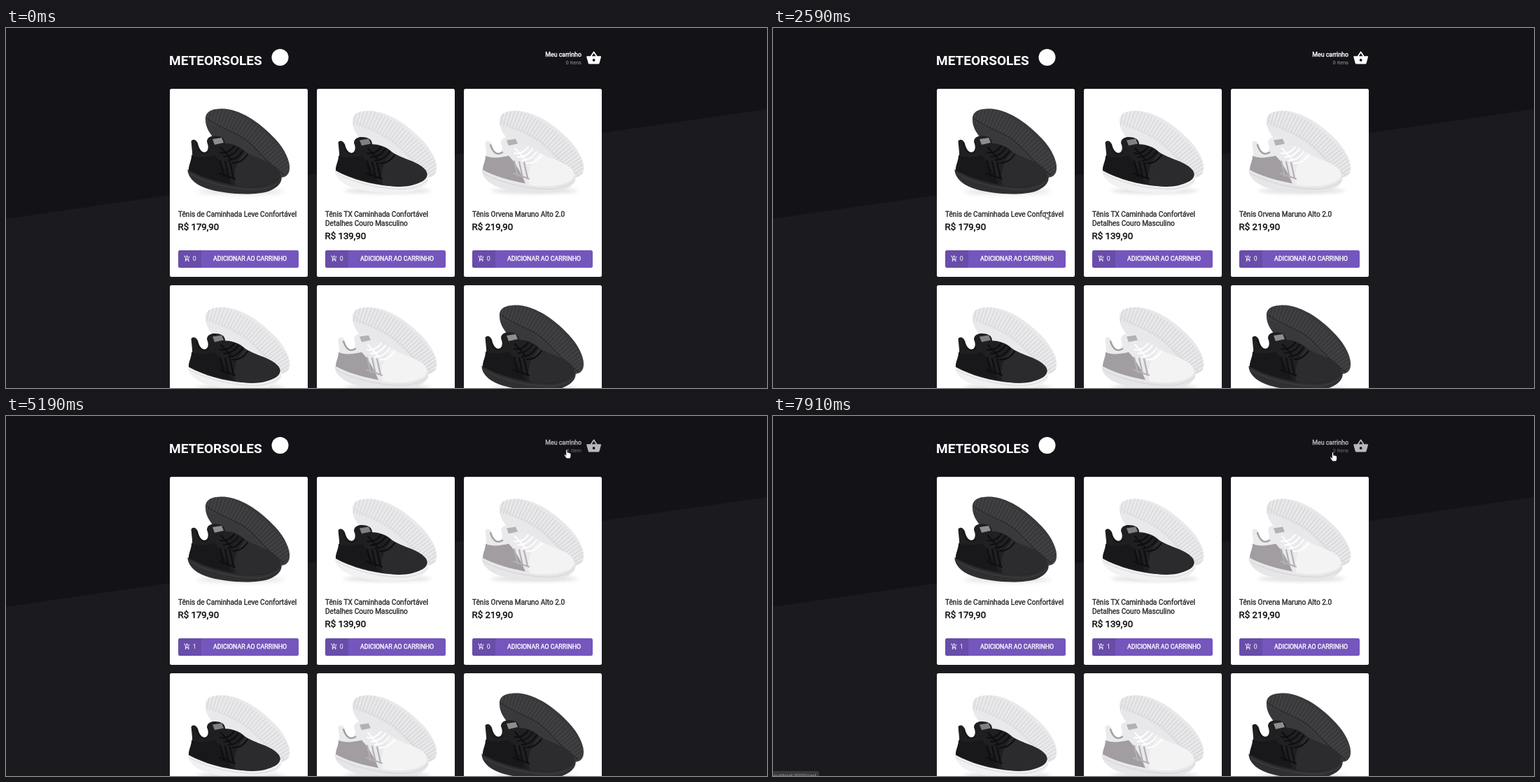
Write an HTML page that moves like this. It is 1087 by 515 pixels and loops after 7.99 s.

```html
<!DOCTYPE html>
<html lang="pt-BR">
<head>
<meta charset="utf-8">
<title>Loja de tênis</title>
<style>
  html, body { margin: 0; width: 100%; height: 100%; overflow: hidden; background: #1b1a1f; }
  svg.stage { display: block; width: 1087px; height: 515px; font-family: Roboto, Arial, sans-serif; }
  .strong { stroke-width: .36px; }
  .brand { font-size: 19px; font-weight: 700; fill: #fff; }
  .name { font-size: 10.08px; fill: #29292d; stroke: #29292d; }
  .price { font-size: 13.23px; fill: #0c0c0e; stroke: #0c0c0e; stroke-width: .45px; }
  .label { font-size: 8.82px; fill: #fff; }
  .label.strong { stroke: #fff; }
  .items { font-size: 7.56px; fill: #99989d; }
  .status { font-family: "Open Sans", sans-serif; font-size: 7.15px; fill: #a5a4a8; }
  .line { fill: none; stroke-linecap: round; }
  .black { --back: #39393c; --rim: #2b2b2e; --ridge: #48484c; --up: #202022; --toe: #2c2c2f;
           --mid: #2f2f32; --edge: #444448; --side: #18181a; --lace: #0e0e10; --tag: #aaa; --cage: #0f0f11; }
  .mixed { --back: #e9e9eb; --rim: #dedee1; --ridge: #d6d6d9; --up: #1f1f22; --toe: #2b2b2e;
           --mid: #f1f1f2; --edge: #d3d3d6; --side: #18181a; --lace: #0d0d0f; --tag: #999; --cage: #0e0e10; }
  .white { --back: #e8e8ea; --rim: #dbdbde; --ridge: #d3d3d6; --up: #eaeaec; --toe: #f3f3f4;
           --mid: #e6e6e8; --edge: #d0d0d3; --side: #a29da0; --lace: #fff; --tag: #a5a3a6; --cage: #b3afb2; }
</style>
</head>
<body>
<svg class="stage" viewBox="0 0 1087 515">
  <defs>
    <filter id="soft" x="-20%" y="-100%" width="140%" height="300%"><feGaussianBlur stdDeviation="3"/></filter>
    <path id="sole" d="M285 132C284 119 294 115 312 115.5C340 118 366 139 384 158C399 174 406 191 405 202C404 212 397 215 386 214L350 205L300 162C291 151 285 142 285 132Z"/>
    <clipPath id="soleClip"><use href="#sole"/></clipPath>
    <g id="shoe">
      <ellipse cx="335" cy="234" rx="62" ry="4" fill="#999" opacity=".3" filter="url(#soft)"/>
      <use href="#sole" style="fill:var(--back)"/>
      <g clip-path="url(#soleClip)">
        <path class="line" d="M284 122C335 132 372 164 402 212"
              style="stroke:var(--ridge);stroke-width:28;stroke-linecap:butt;stroke-dasharray:1.2 3.6"/>
        <path class="line" d="M288 130C304 143 322 146 341 159C358 171 372 194 397 210" style="stroke:var(--rim);stroke-width:1.6"/>
      </g>
      <path d="M259.5 202C280 216 320 226 352 227C374 226 386 218 393 211C396 220 388 229 374 234C354 240 310 238 285 229C268 223 259 212 259.5 202Z" style="fill:var(--mid)"/>
      <path d="M264.5 162C267 158 272 160 274 165C276 174 280 179 285 178C289 175 290 170 287 163C287 156 294 153.5 301 154.5C309 155 313 159 313 165C323 165 334 169 342 177C356 187 379 190 389 203C394 210 391 216 384 220C372 227 356 229 340 227C312 225 282 216 261 204C261 195 267 188 266 178Z" style="fill:var(--up)"/>
      <path d="M342 177C356 187 379 190 389 203C394 210 391 216 384 220C370 227 350 229 328 225C323 206 330 189 342 177Z" style="fill:var(--toe)"/>
      <path d="M265 182C275 187 288 184 298 182C306 190 314 204 322 223C300 219 279 213 261 203C261 195 265 190 265 182Z" style="fill:var(--side)"/>
      <path class="line" d="M306 190L311 212M313 191L318 214M320 192L325 215M305 208L327 216" style="stroke:var(--cage);stroke-width:2.2"/>
      <path class="line" d="M306 178Q317 181 326 169M311 184Q324 184 332 172M317 189Q330 189 338 176M324 193Q336 194 345 181M307 171L322 188" style="stroke:var(--lace);stroke-width:2.1"/>
      <path class="line" d="M272 166Q278 184 289 177" style="stroke:var(--side);stroke-width:2.4"/>
      <path d="M295 159L308 157L311 164L298 167Z" style="fill:var(--tag)" opacity=".8"/>
      <path class="line" d="M262 208C285 222 330 233 362 231C378 229 388 223 392 218" style="stroke:var(--edge);stroke-width:.9"/>
    </g>
    <path id="addIcon" d="M11 9h2V6h3V4h-3V1h-2v3H8v2h3v3zm-4 9c-1.1 0-1.99.9-1.99 2S5.9 22 7 22s2-.9 2-2-.9-2-2-2zm10 0c-1.1 0-1.99.9-1.99 2s.89 2 1.99 2 2-.9 2-2-.9-2-2-2zm-9.83-3.25l.03-.12.9-1.63h7.45c.75 0 1.41-.41 1.75-1.03l3.86-7.01L19.42 4h-.01l-1.1 2-2.76 5H8.53l-.13-.27L6.16 6l-.95-2-.94-2H1v2h2l3.6 7.59-1.35 2.45c-.16.28-.25.61-.25.96 0 1.1.9 2 2 2h12v-2H7.42c-.13 0-.25-.11-.25-.25z"/>
  </defs>

  <path d="M0 0H1087V116L0 273Z" fill="#131217"/>
  <text class="brand" x="233" y="52.7">METEORSOLES</text>
  <circle cx="391.5" cy="42" r="12" fill="#fff"/>

  <g id="cart">
    <text class="label strong" x="822" y="41" text-anchor="end">Meu carrinho</text>
    <text class="items" id="items" x="822" y="51.8" text-anchor="end">0 itens</text>
    <path transform="translate(828.3 31.7) scale(.945)" fill="#fff" d="M17.21 9l-4.38-6.56a.993.993 0 0 0-.83-.42c-.32 0-.64.14-.83.43L6.79 9H2c-.55 0-1 .45-1 1 0 .09.01.18.04.27l2.54 9.27c.23.84 1 1.46 1.92 1.46h13c.92 0 1.69-.62 1.93-1.46l2.54-9.27L23 10c0-.55-.45-1-1-1h-4.79zM9 9l3-4.4L15 9H9zm3 8c-1.1 0-2-.9-2-2s.9-2 2-2 2 .9 2 2-.9 2-2 2z"/>
  </g>

  <g id="cards"></g>

  <g id="status" opacity="0">
    <path d="M0 508H63Q66 508 66 511V515H0Z" fill="#39383c"/>
    <text class="status" x="-1.6" y="517">localhost:3000/cart</text>
  </g>

  <g id="pointer" stroke="#111" stroke-width=".7" stroke-linejoin="round" fill="#fff">
    <path id="arrow" d="M.2 .2V9.8L2.4 7.8L4 11.2L5.5 10.5L4 7.3L6.9 7.1Z"/>
    <path id="hand" d="M-1.1 .8C-1.1 -.4 1 -.4 1 .8V4.3C1.6 3.8 2.6 4 2.8 4.8C3.5 4.3 4.3 4.6 4.5 5.3C5.3 5 5.9 5.5 5.9 6.4V9C5.9 10.8 5 11.5 4.8 12.8H-.6C-.8 11.5 -2.5 10 -3.5 8C-3.9 7 -2.8 6.4 -2.1 7.2L-1.1 8.3Z"/>
  </g>
</svg>

<script>
const LOOP = 7990, STEP = 80, ENTER = 140, PITCH = 210;
const $ = id => document.getElementById(id);

const products = [
  ['black', '179,90', 'Tênis de Caminhada Leve Confortável'],
  ['mixed', '139,90', 'Tênis TX Caminhada Confortável', 'Detalhes Couro Masculino'],
  ['white', '219,90', 'Tênis Orvena Maruno Alto 2.0'],
  ['mixed'], ['white'], ['black']
];

function details(i, price, lines) {
  const names = lines.map((s, k) =>
    `<text class="name strong" x="246" y="${269.9 + k * 12.6}">${s}</text>`).join('');
  const box = 'x="246" y="318" width="172" height="25" rx="2.5"';
  return `${names}
    <text class="price strong" x="245.6" y="${276.4 + lines.length * 12.6}">R$ ${price}</text>
    <rect ${box} fill="#7456bd"/>
    <rect ${box} fill="#5e3fad" id="hover${i}" opacity="0"/>
    <path d="M248.5 318H279V343H248.5Q246 343 246 340.5V320.5Q246 318 248.5 318Z" opacity=".1"/>
    <use href="#addIcon" transform="translate(253.6 324.8) scale(.42)" fill="#fff"/>
    <text class="label" id="count${i}" x="266.7" y="333.4">0</text>
    <text class="label strong" x="348.6" y="333.4" text-anchor="middle">ADICIONAR AO CARRINHO</text>`;
}

// the pale-soled photos sit a little lower
const photo = look => `<use href="#shoe" class="${look}"` +
  (look === 'black' ? '/>' : ' transform="translate(0 6.8) scale(1 .967)"/>');

$('cards').innerHTML = products.map(([look, price, ...lines], i) => `
  <g transform="translate(${i % 3 * PITCH} ${i > 2 ? 281 : 0})">
    <rect x="234" y="87" width="197" height="269" rx="2.5" fill="#fff"/>
    ${photo(look)}
    ${price ? details(i, price, lines) : ''}
  </g>`).join('');

// eased pointer strokes, each from where the last one stopped
const strokes = [
  { from: 80, to: 320, x: 412, y: 116 },
  { from: 1390, to: 2000, x: 323, y: 320 },
  { from: 2000, to: 2180, x: 261, y: 320 },
  { from: 2180, to: 2590, x: 391, y: 262 },
  { from: 2590, to: 2990, x: 286, y: 335 },
  { from: 4150, to: 4720, x: 788.3, y: 72 },
  { from: 4720, to: 5030, x: 801, y: 48 },
  { from: 5350, to: 5760, x: 607.2, y: 279.6 },
  { from: 5760, to: 6150, x: 558, y: 331 },
  { from: 6550, to: 6960, x: 789.6, y: 75 },
  { from: 6960, to: 7140, x: 800, y: 49 },
  { from: 7360, to: 7920, x: 799.6, y: 52 }
];

const clamp = v => Math.max(0, Math.min(1, v));
const ease = u => u * u * (3 - 2 * u);

function place(t) {
  let x = 640, y = -4;
  for (const s of strokes) {
    const u = ease(clamp((t - s.from) / (s.to - s.from)));
    x += (s.x - x) * u;
    y += (s.y - y) * u;
  }
  return [x, y];
}

const within = (left, top, right, bottom) => ([x, y]) =>
  x >= left && x <= right && y >= top && y <= bottom;
const zones = { cart: within(770, 32, 851, 54) };
for (let i = 0; i < 3; i++) {
  const dx = i * PITCH;
  zones['hover' + i] = within(246 + dx, 318, 418 + dx, 343);
}

// share of the last `span` ms spent in a zone: a linear fade in and out
function glow(zone, t, span = 200, n = 16) {
  let hits = 0;
  for (let k = 0; k < n; k++) hits += zone(place(t - k * span / n));
  return hits / n;
}

const show = (id, on) => $(id).setAttribute('visibility', on ? 'visible' : 'hidden');
const fade = (id, v) => $(id).setAttribute('opacity', v.toFixed(3));

function draw(t) {
  const spot = place(Math.floor((t + 20) / STEP) * STEP);
  const hand = Object.values(zones).some(zone => zone(spot));
  $('pointer').setAttribute('transform', `translate(${spot.map(v => v.toFixed(1))})`);
  show('arrow', t >= ENTER && !hand);
  show('hand', t >= ENTER && hand);

  const counts = [+(t >= 3300), +(t >= 6390), 0];
  const total = counts[0] + counts[1];
  counts.forEach((n, i) => {
    $('count' + i).textContent = n;
    fade('hover' + i, glow(zones['hover' + i], t));
  });
  $('items').textContent = total + (total === 1 ? ' item' : ' itens');
  fade('cart', 1 - .3 * glow(zones.cart, t));
  fade('status', glow(zones.cart, t - 350, 250));
}

function tick() {
  draw(performance.now() % LOOP);
  requestAnimationFrame(tick);
}
tick();
</script>
</body>
</html>
```
